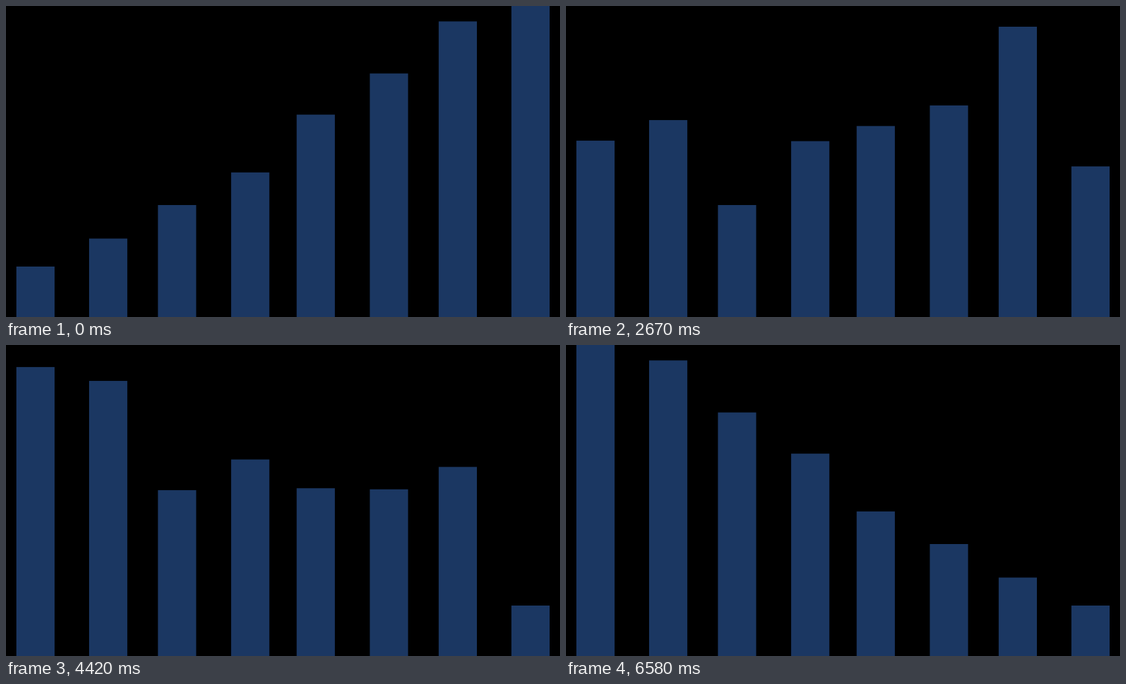
Recreate the animation shown at these times as a matplotlib script. Size 800 by 450 pixels, loop 8000 ms.

```python
import matplotlib.pyplot as plt
from matplotlib.animation import FuncAnimation
from matplotlib.patches import Rectangle

W, H, DPI = 800, 450, 100
LOOP, TICK = 8000, 20      # ms
RATE = 12                  # visible steps per second
BAR_W = 55.2

# The row of bars is mirrored about the middle of the stage.
HALF = [15, 120, 219.4, 325.1]
LEFTS = HALF + [W - BAR_W - x for x in reversed(HALF)]

# The bars rise to the right at first and swap heights with their mirror bar.
START = [377, 336.5, 288, 240.8, 157.2, 97.6, 22.3, -89]
END = START[::-1]

# When each bar starts and stops moving, in ms.
SPANS = [(710, 5715), (15, 4875), (3000, 6460), (20, 4910),
         (1810, 6165), (1420, 6550), (2575, 6330), (0, 3870)]

fig = plt.figure(figsize=(W / DPI, H / DPI), dpi=DPI, facecolor="black")
ax = fig.add_axes([0, 0, 1, 1])
ax.set_xlim(0, W)
ax.set_ylim(H, 0)
ax.axis("off")

bars = [
    ax.add_patch(Rectangle((x, 0), BAR_W, H, color="#1b3762", lw=0, snap=False))
    for x in LEFTS
]


def update(i):
    step = (i * TICK + TICK // 2) * RATE // 1000
    t = step * 1000 / RATE
    for bar, a, b, (begin, end) in zip(bars, START, END, SPANS):
        u = min(max((t - begin) / (end - begin), 0), 1)
        top = a + (b - a) * u
        bar.set_y(top)
        bar.set_height(H + 2 - top)
    return bars


anim = FuncAnimation(fig, update, frames=LOOP // TICK, interval=TICK,
                     repeat=True, repeat_delay=0, blit=False)
plt.show()
```
